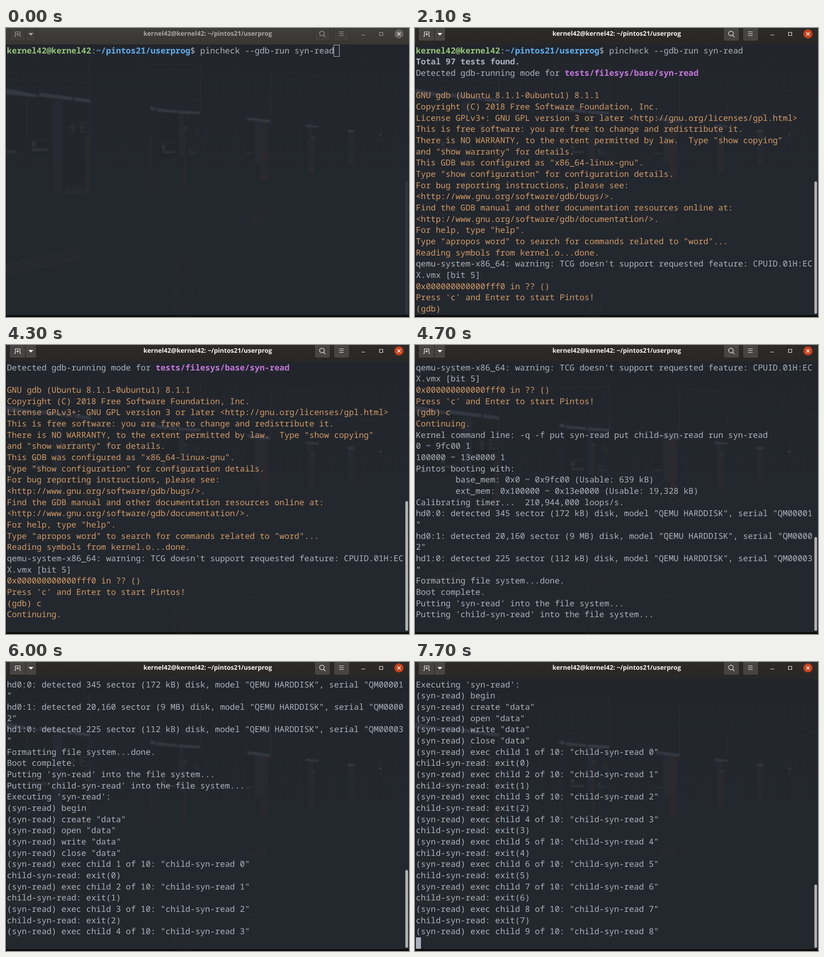
Write an HTML page that moves like this. It is 882 by 635 pixels and loops after 8000 ms.

```html
<!DOCTYPE html>
<html lang="en">
<head>
<meta charset="utf-8">
<title>Terminal session</title>
<style>
html, body { margin: 0; width: 100%; height: 100%; overflow: hidden; background: #0c0b0b; }
#stage { position: relative; width: 882px; height: 635px; overflow: hidden; background: #0c0b0b; }
#stage > *, .bar > * { position: absolute; }
#photo { left: 0; top: 0; }
.bar { left: 0; top: 0; width: 882px; height: 36px; background: linear-gradient(#403e3b, #393734);
  --ink: #aaa7a3; --box: #403e3b; --edge: #2f2d2a; --close: #65625e; --x: #e4e2df; }
.bar.active { background: linear-gradient(#2d2b29, #292725);
  --ink: #f4f3f1; --box: #474543; --edge: #211f1e; --close: #c8421b; --x: #fff; }
.bar p { margin: 0; left: 0; width: 883px; top: 0; text-align: center; color: var(--ink);
  font: 700 13.9px/26px "Open Sans", "Noto Sans", sans-serif; text-rendering: geometricPrecision; }
.bar .box { fill: var(--box); stroke: var(--edge); }
.bar .line { fill: none; stroke: var(--ink); stroke-width: 1.2; }
.bar .solid { fill: var(--ink); }
.line-row { left: 2px; height: 25px; white-space: pre; color: #abb2bf;
  font: 18.083px/25px "Noto Sans Mono", "DejaVu Sans Mono", monospace;
  text-rendering: geometricPrecision; font-variant-ligatures: none; }
.line-row[hidden] { display: none; }
.gdb { color: #d19a66; }
.user { color: #98c379; }
.path { color: #61afef; }
.test { color: #c678dd; }
#cursor { width: 11px; height: 25px; background: #abb2bf; box-sizing: border-box; }
#cursor.hollow { width: 13px; height: 26px; margin: -1px; background: none; border: 1px solid #c3c8d0; }
#thumb { left: 874px; width: 6px; border-radius: 3px; background: #b1b1b1; }
#pointer { left: 790px; }
</style>
</head>
<body>
<div id="stage">
  <svg id="photo" width="882" height="635">
    <defs>
      <linearGradient id="wall" x1="0" y1="0" x2="0" y2="1">
        <stop offset="0" stop-color="#22262c"/><stop offset=".5" stop-color="#23272e"/><stop offset="1" stop-color="#23282f"/>
      </linearGradient>
      <filter id="soft"><feGaussianBlur stdDeviation="1"/></filter>
    </defs>
    <rect x="1" y="36" width="881" height="595" fill="url(#wall)"/>
    <g filter="url(#soft)">
      <path fill="#21252b" d="M1 150H45V270H1zM47 157H102V282H47zM124 165H173V340H124zM333 185H378V285H333zM525 205H553V280H525z"/>
      <path fill="#282b32" d="M102 160H124V362H102zM378 190H389V285H378zM543 205H556V300H543zM660 217H672V320H660zM748 229H760V300H748z"/>
      <path fill="#292b2e" d="M173 235H183V365H173zM388 215H394V350H388zM556 205H574V336H556zM667 242H677V320H667zM316 232H319V356H316z"/>
      <path fill="#363842" d="M1 133L68 146V152L1 146zM73 142L146 152V159L73 151zM150 152L185 157V164L150 160zM316 172L327 174V182L316 180zM330 176L375 181V187L330 183zM378 181L425 184V190L378 188zM528 196L578 202V208L528 202zM656 212L684 215V219L656 217zM748 224H762V229H748zM816 232H823V236H816z"/>
      <path fill="#2e3237" d="M55 244H93V245H55zM57 249H65V260H57zM56 264H92V271H56zM1 268H22V275H1zM341 257H349V267H341zM342 270H369V275H342zM401 265H406V272H401zM401 274H419V277H401zM523 274H540V277H523zM341 252H370V253H341zM388 217H396V222H388zM668 237H676V242H668z"/>
      <path fill="#2a2e31" d="M146 208L156 219H149V231H143V219H136zM162 207H179V211H167V216H177V220H167V226H179V230H162z"/>
      <path fill="#272a2d" d="M130 350Q134 345 150 346L170 350L172 367H128zM1 516L163 480V511L1 545zM532 414L569 407V427L532 434zM173 290H183V320H173zM816 241H822V248H816zM412 218L424 222V240L409 236z"/>
      <path fill="none" stroke="#2d3033" d="M183.500 68V365M46 155V250M425.500 80V188M316 80H425M316 94H424M578.500 95V215M684 125V225M762 150V330M822 165V250M865 362V420M755 375V390M60 105L183 122M1 112L120 120M325 155L424 160M610 98L684 104M750 105L796 130M815 135L880 156M530 558L570 545M295 66L312 96"/>
      <path fill="none" stroke="#32342f" stroke-opacity=".75" d="M388 497Q374 518 376 548Q366 568 370 628M398 496Q412 520 411 548Q413 580 408 602L403 628M386 508Q378 535 386 552Q395 540 394 510M401 515Q400 545 409 552M376 548Q382 572 374 590M384 628Q383 604 392 598Q397 607 394 628"/>
    </g>
    <path stroke="#4b4745" stroke-dasharray="2 5" d="M375 633H406"/>
  </svg>
  <div id="thumb"></div>
  <div id="cursor"></div>
  <svg id="pointer" width="7" height="18" fill="none">
    <path stroke="#c9c9c9" stroke-width="3" d="M1 1.500H6M3.500 1V17M1 16.500H6"/>
    <path stroke="#111" d="M1 1.500H6M3.500 1V17M1 16.500H6"/>
  </svg>
  <div class="bar" id="bar">
    <svg width="882" height="36">
      <path class="box" d="M7.500 -2H66.500V24Q66.500 28.500 62 28.500H12Q7.500 28.500 7.500 24zM675.500 -2H709.500V24Q709.500 28.500 705 28.500H680Q675.500 28.500 675.500 24zM717.500 -2H751.500V24Q751.500 28.500 747 28.500H722Q717.500 28.500 717.500 24z"/>
      <path stroke="var(--edge)" d="M42.500 0V28"/>
      <path class="line" d="M18 18.500H20.500V8.500H30.500V18.500H33M25.500 10.500V17M22.300 13.700H28.700M695 16L699 20M729 8.500H739M729 12.500H739M729 16.500H739M778 15.500H786M817.500 9.500H824.500V16.500H817.500z"/>
      <circle class="line" cx="691.500" cy="12" r="5.200"/>
      <path class="solid" d="M49 11H60L54.500 16.500z"/>
      <circle cx="860" cy="13" r="10" fill="var(--close)"/>
      <path d="M856.500 9.500L863.500 16.500M863.500 9.500L856.500 16.500" stroke="var(--x)" stroke-width="1.600"/>
    </svg>
    <p>kernel42@kernel42: ~/pintos21/userprog</p>
  </div>
</div>
<script>
const LOOP = 8000, ROWS = 24, COL = 10.85, ROW = 24.68;
const $ = id => document.getElementById(id);
const stage = $('stage'), cursor = $('cursor'), thumb = $('thumb'), pointer = $('pointer');

const activeBar = $('bar').cloneNode(true);
activeBar.removeAttribute('id');
activeBar.classList.add('active');
stage.append(activeBar);

const gdbText = `GNU gdb (Ubuntu 8.1.1-0ubuntu1) 8.1.1
Copyright (C) 2018 Free Software Foundation, Inc.
License GPLv3+: GNU GPL version 3 or later <http://gnu.org/licenses/gpl.html>
This is free software: you are free to change and redistribute it.
There is NO WARRANTY, to the extent permitted by law.  Type "show copying"
and "show warranty" for details.
This GDB was configured as "x86_64-linux-gnu".
Type "show configuration" for configuration details.
For bug reporting instructions, please see:
<http://www.gnu.org/software/gdb/bugs/>.
Find the GDB manual and other documentation resources online at:
<http://www.gnu.org/software/gdb/documentation/>.
For help, type "help".
Type "apropos word" to search for commands related to "word"...
Reading symbols from kernel.o...done.`;
const bootText = `Kernel command line: -q -f put syn-read put child-syn-read run syn-read
0 ~ 9fc00 1
100000 ~ 13e0000 1
Pintos booting with:
        base_mem: 0x0 ~ 0x9fc00 (Usable: 639 kB)
        ext_mem: 0x100000 ~ 0x13e0000 (Usable: 19,328 kB)
Calibrating timer...  210,944,000 loops/s.
hd0:0: detected 345 sector (172 kB) disk, model "QEMU HARDDISK", serial "QM00001
"
hd0:1: detected 20,160 sector (9 MB) disk, model "QEMU HARDDISK", serial "QM0000
2"
hd1:0: detected 225 sector (112 kB) disk, model "QEMU HARDDISK", serial "QM00003
"
Formatting file system...done.
Boot complete.
Putting 'syn-read' into the file system...
Putting 'child-syn-read' into the file system...
Executing 'syn-read':
(syn-read) begin
(syn-read) create "data"
(syn-read) open "data"
(syn-read) write "data"
(syn-read) close "data"`;

const lines = [];
function addLine(text, style = '') {
  const el = document.createElement('div');
  el.className = 'line-row ' + style;
  el.textContent = text;
  stage.insertBefore(el, pointer);
  lines.push(el);
  return el;
}
const addAll = (text, style) => text.split('\n').forEach(s => addLine(s, style));

addLine('').innerHTML = '<b class="user">kernel42@kernel42</b>:<b class="path">~/pintos21/userprog</b>$ pincheck --gdb-run syn-read';
addLine('').innerHTML = '<b>Total 97 tests found.</b>';
addLine('').innerHTML = 'Detected gdb-running mode for <b class="test">tests/filesys/base/syn-read</b>';
addLine('');
addAll(gdbText, 'gdb');
addAll("qemu-system-x86_64: warning: TCG doesn't support requested feature: CPUID.01H:EC\nX.vmx [bit 5]");
addAll("0x000000000000fff0 in ?? ()\nPress 'c' and Enter to start Pintos!", 'gdb');
const gdbPrompt = addLine('', 'gdb');
addLine('Continuing.', 'gdb');
addAll(bootText);
for (let i = 0; i < 9; i++) {
  addLine(`(syn-read) exec child ${i + 1} of 10: "child-syn-read ${i}"`);
  addLine(`child-syn-read: exit(${i})`);
}

// [time, value] steps
const lineCount = [[0, 1], [1700, 4], [1800, 19], [2000, 21], [2100, 24], [4300, 25], [4500, 32], [4600, 38],
  [4700, 42], [4800, 49], [5400, 51], [5700, 53], [6000, 55], [6300, 57], [6400, 58], [6500, 59],
  [6800, 60], [6900, 61], [7400, 63], [7500, 65]];
const thumbTop = [[0, 337], [3900, 339], [4300, 343], [4500, 390], [4600, 410], [4700, 422], [4800, 441],
  [5100, 449], [5400, 453], [6000, 457], [6300, 460], [6500, 464], [6900, 468], [7200, 475], [7500, 476], [7700, 489]];
const cursorOn = [[0, 1], [1100, 0], [1500, 1], [2100, 0], [2700, 1], [3300, 0], [3700, 1], [3900, 0],
  [5400, 1], [5700, 0], [6400, 1], [6900, 0], [7500, 1]];

const at = (steps, t) => steps.findLast(([time]) => time <= t)[1];
const textY = row => Math.round(37.5 + ROW * row);
const cursorY = row => Math.floor(38.1 + ROW * row);

function draw(t) {
  const n = at(lineCount, t);
  const prompting = t < 1500 || n === 24;
  const cursorLine = prompting ? n - 1 : n;
  const top = Math.max(0, cursorLine - ROWS + 1);
  gdbPrompt.textContent = t < 3900 ? '(gdb) ' : '(gdb) c';
  lines.forEach((el, i) => {
    el.hidden = i < top || i >= n;
    el.style.top = textY(i - top) + 'px';
  });

  const col = t < 1500 ? 66 : prompting ? 6 : 0;
  cursor.className = t < 500 ? 'hollow' : '';
  cursor.style.left = Math.floor(2 + col * COL) + 'px';
  cursor.style.top = cursorY(cursorLine - top) + 'px';
  cursor.style.visibility = at(cursorOn, t) ? 'visible' : 'hidden';

  const focus = Math.min(1, Math.max(0, (Math.floor(t / 100) - 4) / 3));
  activeBar.style.opacity = focus;
  thumb.style.opacity = 0.1 + 0.9 * focus;
  const y = at(thumbTop, t);
  thumb.style.top = y + 'px';
  thumb.style.height = 628 - y + 'px';

  pointer.style.visibility = t >= 300 && t < 1500 ? 'visible' : 'hidden';
  pointer.style.top = (t < 500 ? 154 : 158) + 'px';
}

const start = performance.now();
function tick() {
  draw((performance.now() - start) % LOOP);
  requestAnimationFrame(tick);
}
draw(0);
requestAnimationFrame(tick);
</script>
</body>
</html>
```
